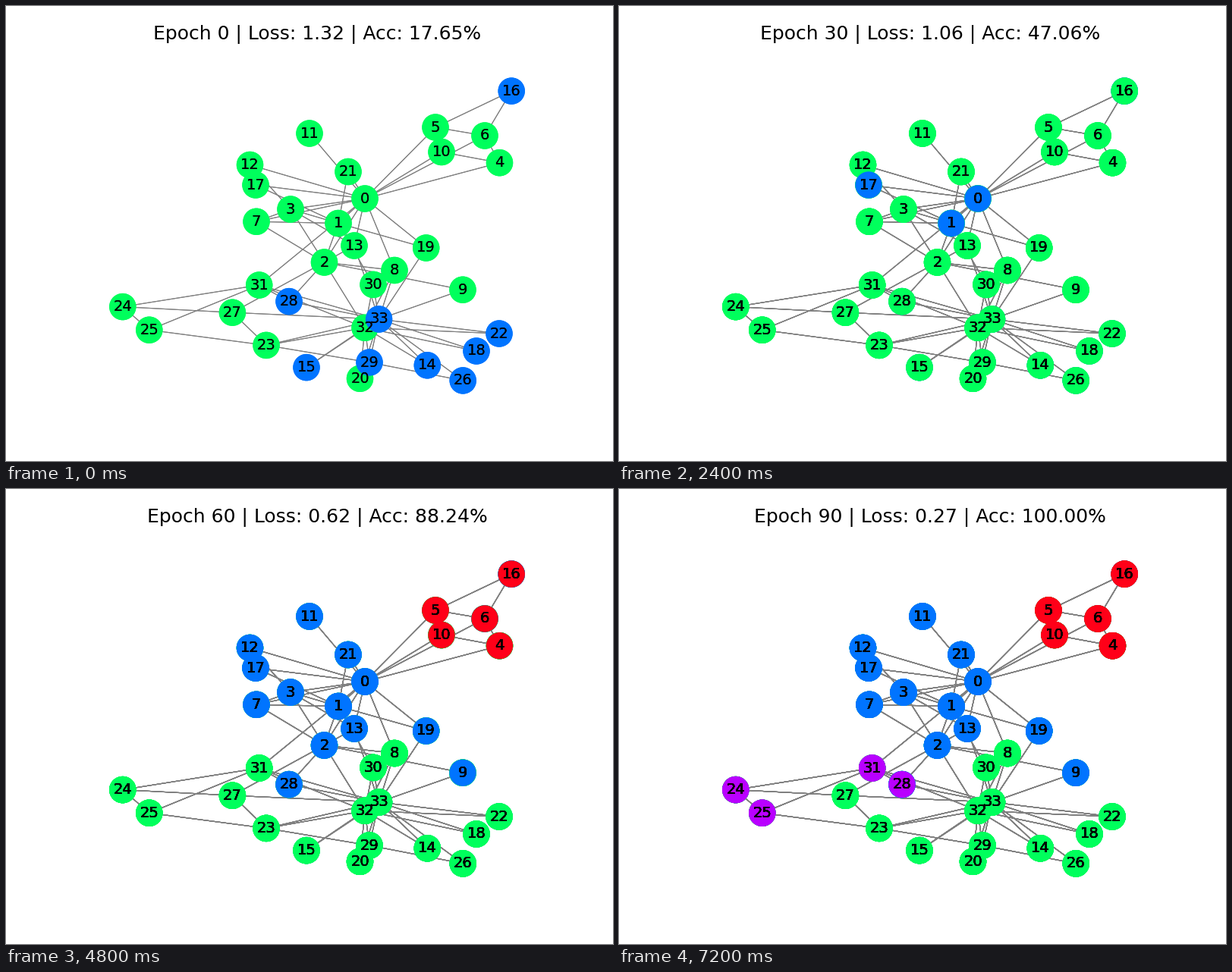
A matplotlib script for the animation above (8 s loop, 800 px wide and 600 px high).

```python
import matplotlib.pyplot as plt
import numpy as np
from matplotlib.animation import FuncAnimation
from matplotlib.collections import LineCollection

WIDTH, HEIGHT, DPI = 800, 600, 100
GREEN, BLUE, PURPLE, RED = range(4)
NODES = 34

# Node centres in stage pixels, y pointing down
POS = np.array([
    (473, 254), (438, 286.5), (419.5, 338), (375, 268), (650.5, 206.7),
    (566, 160), (631, 171), (330, 284.3), (512, 348.5), (602, 374.2),
    (574, 192.5), (400, 168), (321.5, 209.5), (459, 316), (555.3, 473.8),
    (396, 476.6), (666.2, 112.1), (329, 236), (620, 455), (553.7, 319),
    (466.5, 491.3), (451, 218.5), (650, 432), (343, 447.4), (153.8, 396.6),
    (188.8, 427.2), (602.2, 493.9), (298.4, 404.2), (373, 389.6),
    (479, 470), (484, 367.4), (333.7, 368), (473, 424.3), (491.5, 413),
])

LINKS = {
    0: [1, 2, 3, 4, 5, 6, 7, 8, 10, 11, 12, 13, 17, 19, 21, 31],
    1: [2, 3, 7, 13, 17, 19, 21, 30],
    2: [3, 7, 8, 9, 13, 27, 28, 32],
    3: [7, 12, 13],
    4: [6, 10],
    5: [6, 10, 16],
    6: [16],
    23: [25, 27, 29],
    24: [25, 27, 31],
    25: [31],
    26: [29],
    28: [31],
    32: [8, 14, 15, 18, 20, 22, 23, 29, 30, 31],
    33: [8, 9, 13, 14, 15, 18, 19, 20, 22, 23, 26, 27, 28, 29, 30, 31, 32],
}
EDGES = [(POS[a], POS[b]) for a, ends in LINKS.items() for b in ends]

CORE = [0, 1, 2, 3, 7, 11, 12, 13, 17, 21]
CORNER = [4, 5, 6, 10, 16]
LATE = {BLUE: CORE + [9, 19, 28], RED: CORNER, PURPLE: [24, 25, 31]}
FINAL = {BLUE: CORE + [9, 19], RED: CORNER, PURPLE: [24, 25, 28, 31]}

# Predicted groups every ten epochs; unlisted nodes are green
STAGES = [
    {BLUE: [14, 15, 16, 18, 22, 26, 28, 29, 33]},
    {BLUE: [16]},
    {},
    {BLUE: [0, 1, 17]},
    {BLUE: CORE + [16]},
    {BLUE: CORE + [6, 16, 19, 28], RED: [5]},
    {BLUE: CORE + [9, 19, 28], RED: CORNER},
    LATE,
    LATE,
    FINAL,
]
LOSSES = [1.32, 1.25, 1.16, 1.06, 0.93, 0.77, 0.62, 0.48, 0.36, 0.27]


def classes(groups):
    labels = np.full(NODES, GREEN)
    for group, members in groups.items():
        labels[members] = group
    return labels


TRUTH = classes(FINAL)

fig = plt.figure(figsize=(WIDTH / DPI, HEIGHT / DPI), dpi=DPI, facecolor="white")
ax = fig.add_axes([0, 0, 1, 1])


def draw_graph(labels):
    ax.add_collection(LineCollection(EDGES, colors="grey", linewidths=0.8, zorder=1),
                      autolim=False)
    ax.scatter(POS[:, 0], POS[:, 1], s=600, c=labels, cmap="hsv",
               vmin=-2, vmax=3, linewidths=1, zorder=2)
    for node, (x, y) in enumerate(POS):
        ax.text(x, y, str(node), fontsize=14, ha="center", va="center", zorder=3)


def update(step):
    ax.clear()
    ax.axis("off")
    # Each stage is painted over the earlier ones, so soft edges build up
    for i in [0, *range(step + 1)]:
        draw_graph(classes(STAGES[i]))
    ax.set_xlim(0, WIDTH)
    ax.set_ylim(HEIGHT, 0)
    accuracy = 100 * np.mean(classes(STAGES[step]) == TRUTH)
    ax.text(410, 44.22,
            f"Epoch {step * 10} | Loss: {LOSSES[step]:.2f} | Acc: {accuracy:.2f}%",
            fontsize=18, ha="center", va="baseline")
    return []


anim = FuncAnimation(fig, update, frames=len(STAGES), interval=800,
                     init_func=lambda: [], repeat=True, repeat_delay=0)
plt.show()
```
